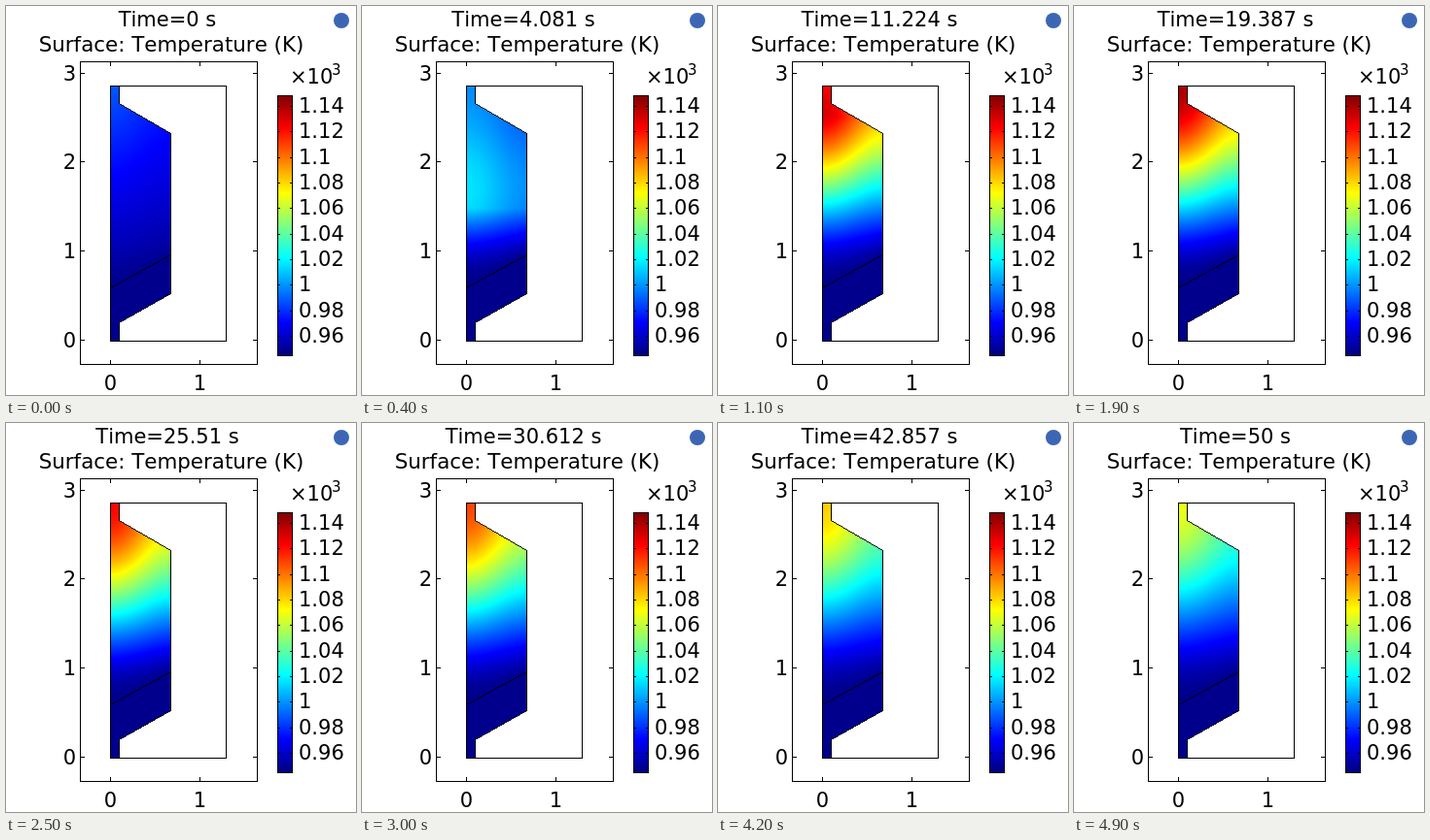
An HTML page with a canvas that plays this animation: 360x401 px, repeating every 5 s.

```html
<!DOCTYPE html>
<html lang="en">
<head>
<meta charset="utf-8">
<title>Surface temperature</title>
<style>
  html, body { margin: 0; width: 100%; height: 100%; overflow: hidden; background: #fff; }
  canvas { display: block; width: 100vw; height: 100vh; }
</style>
</head>
<body>
<canvas id="stage" width="360" height="401"></canvas>
<script>
const ctx = document.getElementById('stage').getContext('2d');
const STEP = 100, STEPS = 50, END = 50;
const FONT = '"DejaVu Sans", sans-serif';

const BODY = { x: 107, y: 82, w: 63, h: 264 };
const OUTLINE = [[107, 82], [116, 82], [116, 100], [169, 131], [169, 296], [116, 326], [116, 345], [107, 345], [107, 82]];
const SEAM = [[107, 290], [169, 256]];

// The heated front climbs for RISE seconds, then the body cools
const RISE = 18.5, COOLING = 66, PEAK = .96, SPREAD = .48;
const EDGE_LOSS = .24;

const clamp = v => Math.min(1, Math.max(0, v));
const smooth = u => u * u * (3 - 2 * u);

// Dark blue, blue, cyan, yellow, red, dark red
function jet(v) {
  v = clamp(v);
  return [3, 2, 1].map(c => Math.round(255 * clamp(1.5 - Math.abs(4 * v - c))));
}

// Scaled temperature on the axis at height u above the seam
function axisHeat(u, time) {
  const front = 1 - (1 - clamp(time / RISE)) ** 2;
  const power = PEAK * Math.exp(-Math.max(0, time - RISE) / COOLING);
  if (u <= front) return power * smooth(u);
  const start = .2 * u;
  const excess = power * smooth(front) - .2 * front;
  return start + excess * Math.exp(-(((u - front) / SPREAD) ** 2));
}

const layer = document.createElement('canvas');
layer.width = BODY.w;
layer.height = BODY.h;
const layerCtx = layer.getContext('2d');
const pixels = layerCtx.createImageData(BODY.w, BODY.h);

function paintField(time) {
  const [[, left], [, right]] = SEAM;
  let p = 0;
  for (let j = 0; j < BODY.h; j++) {
    const y = BODY.y + j;
    const heat = axisHeat(clamp((left - y) / (left - BODY.y)), time);
    for (let i = 0; i < BODY.w; i++) {
      const r = i / (BODY.w - 1);
      const gap = Math.max(0, left + (right - left) * r - y);
      const v = .012 + heat * (1 - EDGE_LOSS * smooth(r)) * (1 - Math.exp(-gap / 12));
      for (const c of jet(v)) pixels.data[p++] = c;
      pixels.data[p++] = 255;
    }
  }
  layerCtx.putImageData(pixels, 0, 0);
}

// Crisp one-pixel line through the points
function line(...points) {
  for (let k = 1; k < points.length; k++) {
    const [x, y] = points[k - 1];
    const dx = points[k][0] - x, dy = points[k][1] - y;
    const n = Math.max(Math.abs(dx), Math.abs(dy));
    for (let i = 0; i <= n; i++) {
      ctx.fillRect(Math.round(x + dx * i / n), Math.round(y + dy * i / n), 1, 1);
    }
  }
}

function frame(l, t, r, b) {
  line([l, t], [r, t], [r, b], [l, b], [l, t]);
}

function label(text, x, y, align = 'center', size = 21) {
  ctx.font = size + 'px ' + FONT;
  ctx.textAlign = align;
  ctx.fillText(text, x, y);
}

function drawBody() {
  ctx.save();
  ctx.beginPath();
  for (const [x, y] of OUTLINE) ctx.lineTo(x + .5, y + .5);
  ctx.clip();
  ctx.drawImage(layer, BODY.x, BODY.y);
  ctx.restore();
  line(...OUTLINE);
  line(...SEAM);
  frame(107, 82, 226, 345);
}

function drawAxes() {
  const l = 76, r = 258, t = 57, b = 369;
  frame(l, t, r, b);
  for (let n = 0; n <= 3; n++) {
    const y = Math.floor(344.2 - n * 91.7);
    line([l, y], [l + 4, y]);
    line([r - 4, y], [r, y]);
    label(n, 72, y + 8, 'right');
  }
  for (let n = 0; n <= 1; n++) {
    const x = 107 + n * 92;
    line([x, t], [x, t + 4]);
    line([x, b - 4], [x, b]);
    label(n, x + .5, 396);
  }
}

function drawScale() {
  const x = 279, y = 92, w = 16, h = 268;
  for (let j = 0; j < h; j++) {
    ctx.fillStyle = 'rgb(' + jet(1 - j / (h - 1)) + ')';
    ctx.fillRect(x, y + j, w, 1);
  }
  ctx.fillStyle = '#000';
  frame(x, y, x + w - 1, y + h);
  for (let n = 0; n < 10; n++) {
    const ty = Math.round(103 + n * 26.33);
    line([x, ty], [x + 2, ty]);
    line([x + w - 3, ty], [x + w - 1, ty]);
    label(+(1.14 - n * .02).toFixed(2), 301, ty + 7, 'left');
  }
  label('×10', 292, 80, 'left');
  label('3', 335, 71, 'left', 15);
}

function draw(step) {
  const time = step * END / (STEPS - 1);
  paintField(time);
  ctx.fillStyle = '#fff';
  ctx.fillRect(0, 0, 360, 401);
  ctx.fillStyle = '#000';
  ctx.fontKerning = 'none';
  label('Time=' + Math.floor(time * 1000) / 1000 + ' s', 166, 21);
  label('Surface: Temperature (K)', 170, 47, 'center', 21.4);
  drawAxes();
  drawBody();
  drawScale();
  ctx.fillStyle = '#3c66b4';
  ctx.beginPath();
  ctx.arc(345, 15, 8, 0, 2 * Math.PI);
  ctx.fill();
}

let shown = -1;
const start = performance.now();
function tick() {
  const step = Math.floor((performance.now() - start) / STEP) % STEPS;
  if (step !== shown) draw(shown = step);
  requestAnimationFrame(tick);
}
tick();
</script>
</body>
</html>
```
